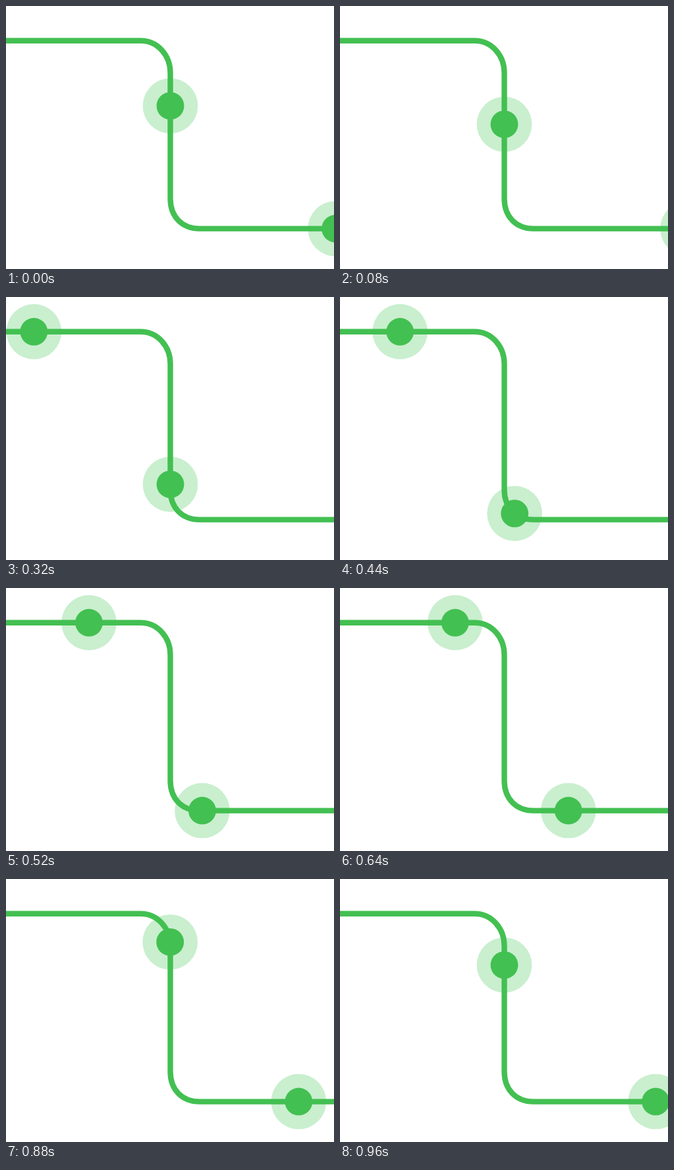
Animation, 500 px wide and 400 px high, one loop 1 s. Source, as an HTML page:

```html
<!DOCTYPE html>
<html lang="en">
<head>
<meta charset="utf-8">
<title>Dots on a line</title>
<style>
  html, body { margin: 0; width: 100%; height: 100%; overflow: hidden; background: #fff; }
  svg { display: block; width: 500px; height: 400px; }
</style>
</head>
<body>
<svg viewBox="0 0 500 400">
  <defs>
    <g id="dot">
      <circle r="42" fill="#c9efce"/>
    </g>
    <g id="core">
      <circle r="21" fill="#43c052"/>
    </g>
  </defs>
  <g id="halos"></g>
  <path id="line" fill="none" stroke="#43c052" stroke-width="8.4"
    d="M-90.5 52.8H205C231 52.8 250.5 74.8 250.5 102V293C250.5 320.4 268.3 338.6 295 338.6H620"/>
  <g id="cores"></g>
</svg>
<script>
  const LOOP = 1000, STEP = 40, SPACING = 420, TICKS = 60;
  const line = document.getElementById('line');

  function addUse(parent, ref) {
    const use = document.createElementNS('http://www.w3.org/2000/svg', 'use');
    use.setAttribute('href', ref);
    document.getElementById(parent).append(use);
    return use;
  }

  const dots = [0, 1, 2].map(() => [addUse('halos', '#dot'), addUse('cores', '#core')]);

  function draw(now) {
    // Shown at 25 fps, moving in whole ticks of 1/60 s
    const shown = Math.floor((now % LOOP) / STEP) * STEP;
    const tick = Math.max(0, Math.floor(shown * TICKS / LOOP - 0.01));
    dots.forEach((parts, i) => {
      const p = line.getPointAtLength((i + tick / TICKS) * SPACING);
      for (const part of parts) part.setAttribute('transform', `translate(${p.x} ${p.y})`);
    });
  }

  let start;
  function frame(now) {
    start ??= now;
    draw(Math.max(0, now - start));
    requestAnimationFrame(frame);
  }
  draw(0);
  requestAnimationFrame(frame);
</script>
</body>
</html>
```
